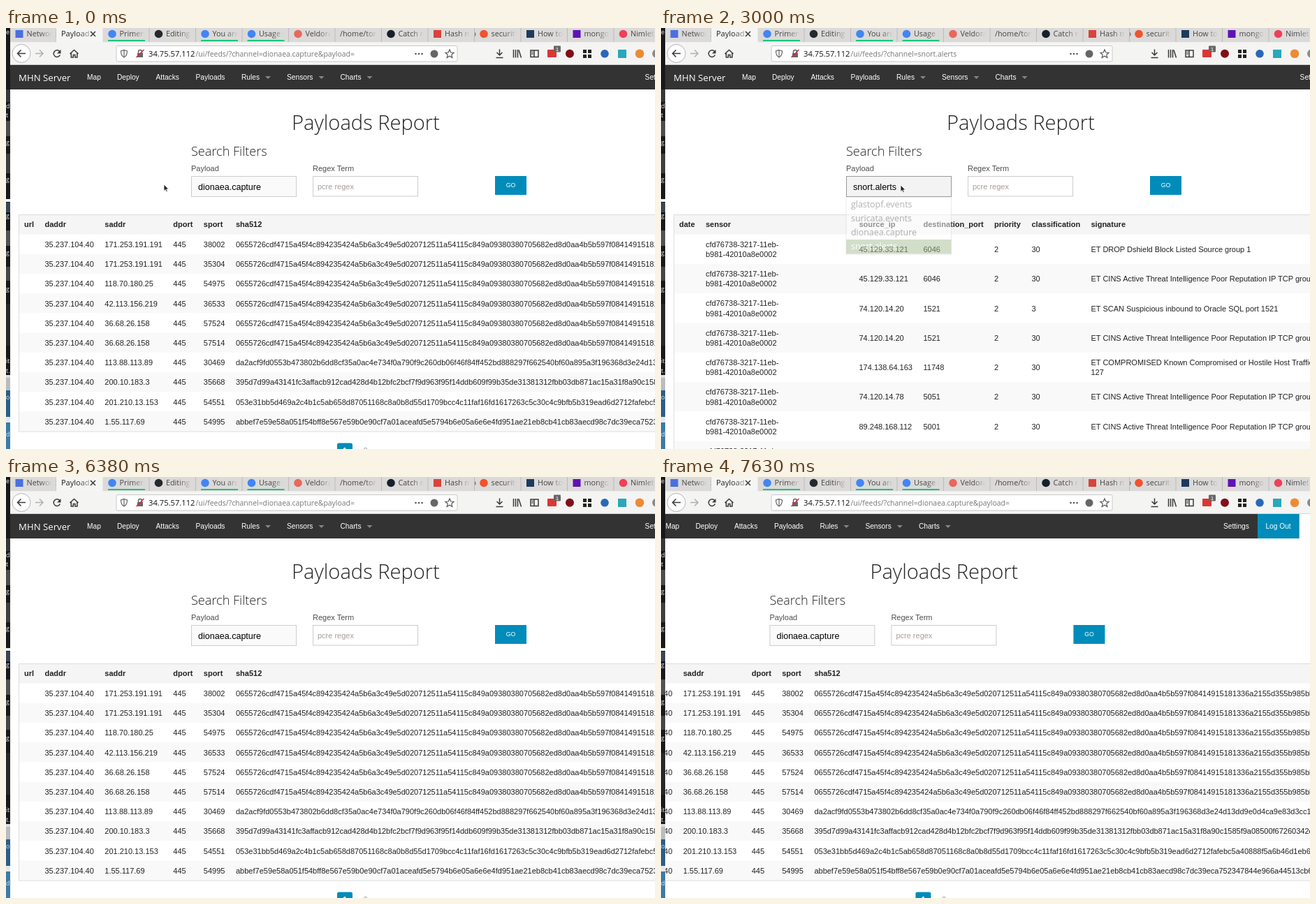
Write an HTML page that moves like this. It is 929 px wide and 603 px high and loops after 8 s.

```html
<!DOCTYPE html>
<html lang="en">
<head>
<meta charset="utf-8">
<title>Payloads Report</title>
<style>
  html, body { margin: 0; width: 100%; height: 100%; overflow: hidden; background: #fff; }
  svg { display: block; font-family: "Liberation Sans", Arial, sans-serif; }
  text { white-space: pre; }
  .ui { font-family: "Open Sans", sans-serif; }
  .light { font-family: "Open Sans", sans-serif; font-weight: 300; }
  .bold { font-weight: bold; }
  .line { fill: none; stroke: #3a3a3a; stroke-width: 1.5; }
</style>
</head>
<body>
<svg id="stage" width="929" height="603" viewBox="0 0 929 603"></svg>
<script>
const STEP = 125, LOOP = 8000;
const BLUE = '#008cba';
const $ = id => document.getElementById(id);

const text = (x, y, str, size = 11, fill = '#222', attrs = '') =>
  `<text x="${x}" y="${y}" font-size="${size}" fill="${fill}" ${attrs}>${str}</text>`;
const rect = (x, y, w, h, fill, attrs = '') =>
  `<rect x="${x}" y="${y}" width="${w}" height="${h}" fill="${fill}" ${attrs}/>`;
const circle = (x, y, r, fill, attrs = '') =>
  `<circle cx="${x}" cy="${y}" r="${r}" fill="${fill}" ${attrs}/>`;
const line = (d, attrs = '') => `<path class="line" d="${d}" ${attrs}/>`;
const fade = (id, color) => `<linearGradient id="${id}">
  <stop stop-color="${color}" stop-opacity="0"/><stop offset=".75" stop-color="${color}"/></linearGradient>`;

function desktopEdge() {
  const patches = [[88, 18, '#34373c'], [133, 22, '#4b4d50'], [180, 28, '#3d3f43'], [245, 4, '#f2f2f2'],
    [250, 14, '#3b4654'], [290, 22, '#505256'], [342, 20, '#444649'], [395, 60, '#26282c'], [497, 4, '#ddd'],
    [501, 18, '#b9bcc0'], [519, 38, '#2b5f86'], [557, 8, '#e4e8ec'], [565, 38, '#3c7ba8']];
  const letters = [['e', 9], ['d', 115], ['t', 128], ['g', 167], ['g', 220], ['g', 272], ['g', 325],
    ['g', 377], ['it', 480], ['t.', 494], ['o', 532], ['d', 585]];
  return rect(0, 0, 6, 603, '#17191d') +
    patches.map(([y, h, c]) => rect(0, y, 6, h, c)).join('') +
    letters.map(([s, y]) => text(0, y, s, 9, '#e4e4e4', 'class="ui"')).join('');
}

function tabBar() {
  const tabs = [['Network', '#4a6fe0', 1], ['', ''], ['Primers', '#4285f4'], ['Editing', '#24292e'],
    ['You are', '#4285f4'], ['Usage st', '#4285f4'], ['Veldora', '#e8685c'], ['/home/tor', ''],
    ['Catch m', '#15202b'], ['Hash mo', '#d8433b', 1], ['security', '#f0532d'], ['How to', '#1d3a5c', 1],
    ['mongo', '#5f12b5', 1], ['Nimlet', '#ee4056']];
  let out = rect(6, 0, 923, 20.5, '#dbdad9');
  tabs.forEach(([name, color, square], i) => {
    const x = 5.5 + 66.5 * i;
    if (i === 1) {
      out += rect(x, 0, 66.5, 21, '#f5f5f4') + text(79, 12, 'Payload', 11, '#222', 'id="tabTitle" class="ui"') +
        rect(x + 31, 0, 34, 20, 'url(#fadeActive)') + circle(89, 9, 1.9, '#777', 'id="throbber"') +
        line('M121 5l7 7m0-7l-7 7', 'stroke-width="1.3"');
      return;
    }
    if (color) out += square ? rect(x + 8, 3, 11, 11, color) : circle(x + 13.5, 8.5, 5.8, color);
    out += text(x + (color ? 24 : 7), 12, name, 10.8, '#444', 'class="ui"') +
      rect(x + 43, 0, 23, 20, 'url(#fadeTab)') + rect(x + 66, 0, 1, 20, '#bcbbba');
    if ([2, 4, 5].includes(i)) out += rect(x + 7.5, 17, 53, 2, '#12c77c');
  });
  return out;
}

function toolbar() {
  const squares = [[826, 31], [833, 31], [826, 38], [833, 38]];
  return rect(6, 20.5, 923, 32.5, '#f4f4f3') +
    circle(22, 36.5, 13, '#fff', 'stroke="#b5b5b5"') +
    line('M28 36.5H16.500m5-5l-5 5 5 5', 'stroke-width="1.8"') +
    line('M42 36.500h11m-5-5l5 5-5 5', 'style="stroke:#b0b0b0"') +
    `<g id="reload">${line('M77 34a4.800 4.800 0 1 0 .4 4.500')}<path d="M78.500 31v5.500H73z" fill="#3a3a3a"/></g>` +
    line('M67.500 32l10 10m0-10l-10 10', 'id="stop"') +
    line('M91.500 37l6-5.500 6 5.500m-10.200-1v6h3v-3.500h2.600v3.500h3v-6') +
    rect(158, 25.5, 488, 22.5, '#fff', 'rx="2" stroke="#c9c9c9"') +
    line('M169 31.500l4.500 1.500c0 5-1.500 7.500-4.500 9-3-1.500-4.500-4-4.500-9zv10', 'style="stroke:#666;stroke-width:1.200"') +
    rect(188, 36, 8, 6, '#666') + line('M189.500 36v-2a2.500 2.500 0 0 1 5 0v2', 'style="stroke:#666"') +
    line('M186.500 42l11-11', 'style="stroke:#d7264c"') +
    text(204, 41, '34.75.57.112', 11.2, '#111', 'class="ui"') +
    text(271.5, 41, '', 10.45, '#777', 'id="path" class="ui"') +
    [586.5, 591, 595.5].map(x => circle(x, 37, 1.3, '#555')).join('') +
    circle(613, 37, 5.5, '#666') +
    line('M635 31l1.800 4 4.200.4-3.200 2.900 1 4.200-3.800-2.300-3.800 2.300 1-4.200-3.200-2.900 4.200-.4z', 'style="stroke:#555;stroke-width:1.200"') +
    line('M706.500 30.500v8.500m-4-4l4 4 4-4m-9 7.500h10') +
    line('M726.500 31v11.500m3-11.500v11.500m3-11.500v11.500m1.500-11l3.500 11') +
    line('M751 32h11v9.500h-11zm5 0v9.500m-3.500-7h2m-2 2.500h2') +
    rect(775, 31, 13, 11, '#d93636', 'rx="1"') + rect(784, 25.5, 10, 9, '#666', 'rx="1"') +
    text(786.8, 33, '1', 8, '#fff') +
    circle(807, 36.8, 6, '#800f1b') +
    squares.map(([x, y]) => rect(x, y, 5, 5, '#222')).join('') +
    circle(857, 36.8, 5.8, '#2868b8') + rect(876, 31, 12, 12, '#2aa7b8') +
    circle(907, 36.8, 6.3, '#ec8b35') + circle(931, 36.8, 6, '#8b8b8b') +
    rect(6, 52, 923, 1, '#d5d5d5');
}

function pageHeader() {
  const items = [[116, 'Map'], [159, 'Deploy'], [214.5, 'Attacks'], [271.5, 'Payloads'], [337, 'Rules', 375],
    [402, 'Sensors', 451.5], [478.5, 'Charts', 520.5], [914.6, 'Settings'], [975, 'Log Out']];
  return rect(6, 53, 1017, 35, '#333') + rect(259.5, 53, 65.5, 35, '#222', 'id="navHover"') +
    rect(963.5, 53, 59.5, 35, BLUE) + text(18, 76, 'MHN Server', 13.2, '#fff', 'class="ui"') +
    items.map(([x, s, caret]) => text(x, 74, s, 10.2, '#fff') +
      (caret ? `<path d="M${caret - 4} 69h8l-4 4z" fill="#858585"/>` : '')).join('') +
    text(409, 146, 'Payloads Report', 29.1, '#222', 'class="light"') +
    text(265, 183, 'Search Filters', 18.1, '#222', 'class="light"') +
    text(265, 204.5, 'Payload', 11, '#4d4d4d') + text(439, 204.5, 'Regex Term', 11, '#4d4d4d') +
    rect(265.5, 212.5, 150, 29, '#fafafa', 'id="select" stroke="#ccc"') +
    text(275, 231.5, '', 12.55, '#000', 'id="choice"') +
    rect(439.5, 212.5, 150, 28.5, '#fff', 'stroke="#ccc"') +
    text(446, 230.5, 'pcre regex', 11, '#a59e98') +
    rect(700, 212, 45, 27, BLUE, 'id="go"') + text(715.8, 228, 'GO', 8.7, '#fff');
}

function table(columns, rows, rowHeight) {
  const top = 295.6, height = top - 267 + rows.length * rowHeight;
  let out = rect(18, 267, 1900, 28.6, '#f5f5f5') +
    columns.map(([x, name]) => text(x, 285, name, 11, '#222', 'class="bold"')).join('');
  rows.forEach((cells, r) => {
    const y = top + r * rowHeight;
    if (r % 2) out += rect(18, y, 1900, rowHeight, '#f9f9f9');
    cells.forEach((cell, c) => cell.split('\n').forEach((part, i, all) => {
      out += text(columns[c][0], y + rowHeight / 2 + 4.2 + (i - (all.length - 1) / 2) * 14.2, part);
    }));
  });
  return out + rect(18.5, 267.5, 1900, height, 'none', 'stroke="#ddd"');
}

function captureTable() {
  const common = '0655726cdf4715a45f4c894235424a5b6a3c49e5d020712511a54115c849a09380380705682ed8d0aa4b5b597f08414915181336a2155d355b985bbb';
  const hits = [
    ['171.253.191.191', '38002'], ['171.253.191.191', '35304'], ['118.70.180.25', '54975'],
    ['42.113.156.219', '36533'], ['36.68.26.158', '57524'], ['36.68.26.158', '57514'],
    ['113.88.113.89', '30469', 'da2acf9fd0553b473802b6dd8cf35a0ac4e734f0a790f9c260db06f46f84ff452bd888297f662540bf60a895a3f196368d3e24d13dd9e0d4ca9e83d3cc10'],
    ['200.10.183.3', '35668', '395d7d99a43141fc3affacb912cad428d4b12bfc2bcf7f9d963f95f14ddb609f99b35de31381312fbb03db871ac15a31f8a90c1585f9a08500f67260342d'],
    ['201.210.13.153', '54551', '053e31bb5d469a2c4b1c5ab658d87051168c8a0b8d55d1709bcc4c11faf16fd1617263c5c30c4c9bfb5b319ead6d2712fafebc5a40888f5a6b46d1eb6'],
    ['1.55.117.69', '54995', 'abbef7e59e58a051f54bff8e567e59b0e90cf7a01aceafd5e5794b6e05a6e6e4fd951ae21eb8cb41cb83aecd98c7dc39eca752347844e966a44513cb6']];
  const columns = [[26, 'url'], [55.5, 'daddr'], [141.3, 'saddr'], [239.3, 'dport'], [282.8, 'sport'], [329, 'sha512']];
  return table(columns, hits.map(([ip, port, hash = common]) => ['', '35.237.104.40', ip, '445', port, hash]), 28.2) +
    rect(474, 594.5, 22, 22, BLUE, 'rx="2.5"') + text(482, 608.5, '1', 11, '#fff', 'class="bold"') +
    text(511.5, 608.5, '2', 11, '#999');
}

function alertTable() {
  const cins = 'ET CINS Active Threat Intelligence Poor Reputation IP TCP group 31';
  const alerts = [
    ['45.129.33.121', '6046', '30', 'ET DROP Dshield Block Listed Source group 1'],
    ['45.129.33.121', '6046', '30', cins],
    ['74.120.14.20', '1521', '3', 'ET SCAN Suspicious inbound to Oracle SQL port 1521'],
    ['74.120.14.20', '1521', '30', cins],
    ['174.138.64.163', '11748', '30', 'ET COMPROMISED Known Compromised or Hostile Host Traffic group\n127'],
    ['74.120.14.78', '5051', '30', cins],
    ['89.248.168.112', '5001', '30', cins],
    ['89.248.168.112', '5001', '30', cins]];
  const columns = [[26, 'date'], [64, 'sensor'], [283.5, 'source_ip'], [375.5, 'destination_port'],
    [477, 'priority'], [530.5, 'classification'], [615.5, 'signature']];
  return table(columns, alerts.map(([ip, port, kind, note]) =>
    ['', 'cfd76738-3217-11eb-\nb981-42010a8e0002', ip, port, '2', kind, note]), 42.3);
}

function dropdown() {
  const options = ['glastopf.events', 'suricata.events', 'dionaea.capture', 'snort.alerts'];
  return rect(265, 242, 150.5, 82, '#fff', 'stroke="#bbb" stroke-width=".6"') +
    rect(265, 303, 150.5, 20.5, '#a9be94') +
    options.map((s, i) => text(272, 257 + 20.1 * i, s, 12.4, i === 3 ? '#fff' : '#666', 'class="ui"')).join('');
}

$('stage').innerHTML = `
  <defs>${fade('fadeTab', '#dbdad9')}${fade('fadeActive', '#f5f5f4')}
    <clipPath id="view">${rect(6, 53, 923, 550, '#fff')}</clipPath></defs>
  ${desktopEdge()}${tabBar()}${toolbar()}
  <g clip-path="url(#view)">${rect(6, 53, 923, 550, '#fff')}
    <g id="page">${pageHeader()}
      <g id="captures">${captureTable()}</g>
      <g id="alerts">${alertTable()}</g>
      <g id="menu" opacity=".5">${dropdown()}</g>
    </g>
  </g>
  <g id="arrow"><path d="M0 0v9.500l2.200-2 1.500 3.300 1.600-.7-1.500-3.200h3z" fill="#222" stroke="#fff" stroke-width=".8"/></g>
  <g id="hand"><path d="M-.8 0q.9-.8 1.700 0v3.500l3.800.9q1 .4.800 1.400l-.8 3.700h-5l-2.600-3.500q.2-1.200 1.300-.5l.8.7z"
    fill="#fff" stroke="#222" stroke-width=".9"/></g>`;

const show = (id, on) => $(id).setAttribute('visibility', on ? 'visible' : 'hidden');
const ease = p => { p = Math.min(1, Math.max(0, p)); return p * p * (3 - 2 * p); };
const mix = (a, b, p) => a.map((v, i) => v + (b[i] - v) * p);

const START = [226, 224], NAV = [304.5, 75.5], SELECT = [343, 225], GO = [722, 223], EXIT = [732, 640];

function cursorAt(k) {
  if (k < 19) return mix(START, NAV, ease(k / 7));
  if (k < 44) return mix(NAV, SELECT, ease((k - 18) / 5));
  return mix(GO, EXIT, ease((k - 48) / 3));
}

function render(t) {
  const k = Math.floor(t / STEP);
  const within = (from, to) => k >= from && k < to;
  const loading = within(11, 17) || within(44, 47);
  const stopping = within(11, 20) || within(44, 50);
  const alerts = within(15, 46), menu = within(24, 44), onGo = within(44, 49);
  const [x, y] = cursorAt(k);

  show('throbber', loading);
  const spin = (k - (k < 40 ? 11 : 42)) * STEP / 1000;
  $('throbber').setAttribute('cx', 84 + 5 * Math.sin(2 * Math.PI * spin));
  $('tabTitle').setAttribute('x', loading ? 97 : 79);
  show('stop', stopping);
  show('reload', !stopping);
  $('path').textContent = '/ui/feeds/?channel=' + (within(11, 44) ? 'snort.alerts' : 'dionaea.capture&payload=');

  show('captures', !alerts);
  show('alerts', alerts);
  show('menu', menu);
  $('choice').textContent = within(15, 44) ? 'snort.alerts' : 'dionaea.capture';
  const onSelect = within(23, 44);
  $('select').setAttribute('fill', onSelect ? '#f3f3f3' : '#fafafa');
  $('select').setAttribute('stroke', onSelect ? '#999' : '#ccc');
  $('go').setAttribute('fill', onGo ? '#0b78a0' : BLUE);
  show('navHover', y < 88 && x > 259 && x < 325);

  const scroll = k < 58 ? 0 : k < 59 ? 2 : k < 61 ? 30 : 109.6;
  $('page').setAttribute('transform', `translate(${-scroll})`);

  show('hand', onGo);
  show('arrow', !onGo && k < 51);
  for (const id of ['hand', 'arrow']) $(id).setAttribute('transform', `translate(${x} ${y})`);
}

const began = performance.now();
(function loop() {
  render((performance.now() - began) % LOOP);
  requestAnimationFrame(loop);
})();
</script>
</body>
</html>
```
